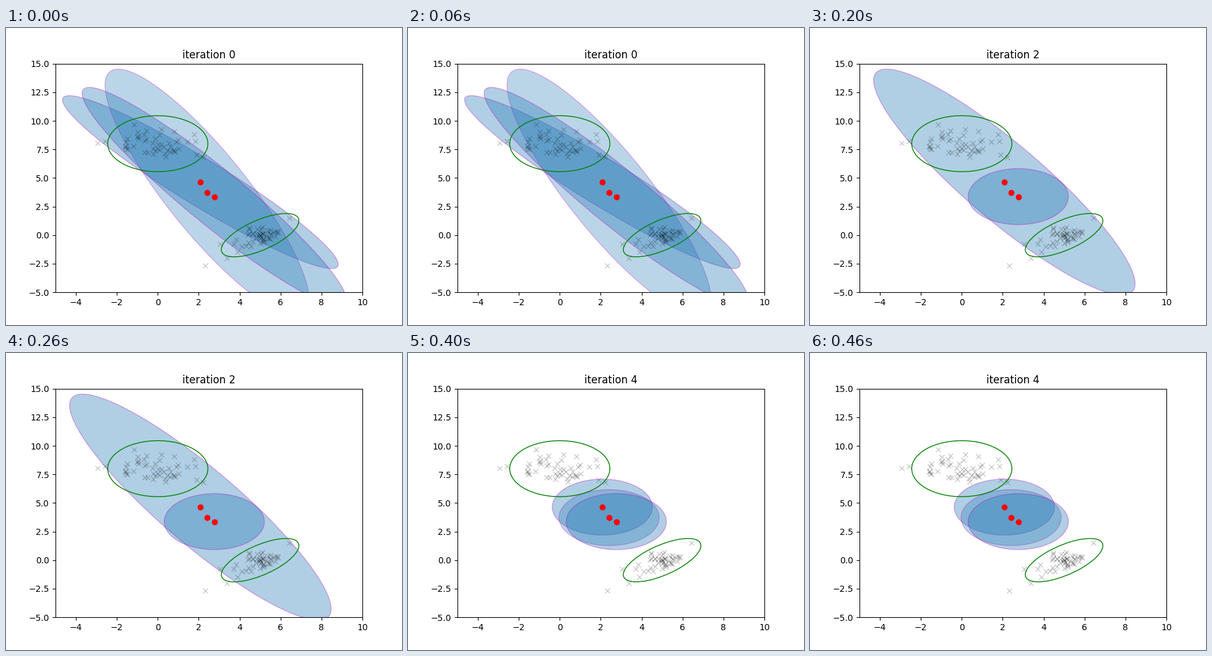
A matplotlib script that plays this animation: 640 by 480 pixels, repeating every 0.5 s.

```python
import numpy as np
import matplotlib.pyplot as plt
from matplotlib.animation import FuncAnimation
from matplotlib.patches import Ellipse

plt.rcParams["text.kerning_factor"] = 6
RADIUS = np.sqrt(5.991)  # 95 % contour of a 2-D Gaussian

MEANS = np.array([(2.08, 4.64), (2.41, 3.72), (2.76, 3.37)])
WEIGHTS = (0.35, 0.30, 0.35)

# Contour shapes: half width, half height, correlation
UNIT = (RADIUS, RADIUS, 0)
WIDE = (6.39, 9.88, -0.9)
TILTED = (RADIUS * 0.6**0.5, RADIUS * 0.6**0.5, 2 / 3)
STEPS = [
    [(6.735, 7.56, -0.95), (4.99, 10.8, -0.87), (6.46, 9.55, -0.945)],
    [(0.955, 0.275, 0), None, WIDE],
    [WIDE, None, UNIT],
    [UNIT, WIDE, UNIT],
    [UNIT, UNIT, UNIT],
]

# Samples far from their cluster; the rest are scattered around its middle
STRAYS = [(-2.94, 8.05), (-2.58, 8.21), (-1.16, 9.67), (1.77, 8.81),
          (1.83, 8.21), (1.90, 7.02), (2.23, 6.81), (2.32, -2.66),
          (3.38, -2.01), (3.04, -0.77), (3.89, -1.47), (6.43, 1.50)]


def cluster(rng, count, center, shape):
    """Random points inside a contour, denser towards its center."""
    hx, hy, rho = shape
    r = rng.uniform(0, 1, count)
    turn = rng.uniform(0, 2 * np.pi, count)
    offset = r * [hx * np.cos(turn), hy * np.sin(turn + np.arcsin(rho))]
    return center + offset.T


def contour(center, shape, **style):
    """Ellipse with the given half extents along x and y and correlation."""
    hx, hy, rho = shape
    cov = np.array([[hx * hx, rho * hx * hy], [rho * hx * hy, hy * hy]])
    size, axes = np.linalg.eigh(cov)
    angle = np.degrees(np.arctan2(axes[1, 0], axes[0, 0]))
    width, height = 2 * np.sqrt(size)
    return Ellipse(center, width, height, angle=angle, **style)


rng = np.random.default_rng(4)
points = np.vstack([
    STRAYS,
    cluster(rng, 43, (0, 7.8), (1.7, 1.5, 0)),
    cluster(rng, 45, (5, 0.05), (1.4, 1.2, 0.55)),
])

fig, ax = plt.subplots(figsize=(6.4, 4.8), dpi=100)


def draw(step):
    ax.clear()
    ax.set(xlim=(-5, 10), ylim=(-5, 15), title=f"iteration {step}")
    ax.plot(*points.T, "kx", alpha=0.2)
    for mean, weight, shape in zip(MEANS, WEIGHTS, STEPS[step]):
        if shape:
            ax.add_patch(contour(mean, shape, fc="C0", ec="m", alpha=weight))
    ax.plot(*MEANS.T, "ro")
    for center, shape in (((0, 8), UNIT), ((5, 0), TILTED)):
        ax.add_patch(contour(center, shape, fc="none", ec="g"))
    return ax.get_children()


anim = FuncAnimation(fig, draw, frames=len(STEPS), init_func=lambda: [],
                     interval=100, repeat=True, repeat_delay=0)
plt.show()
```
